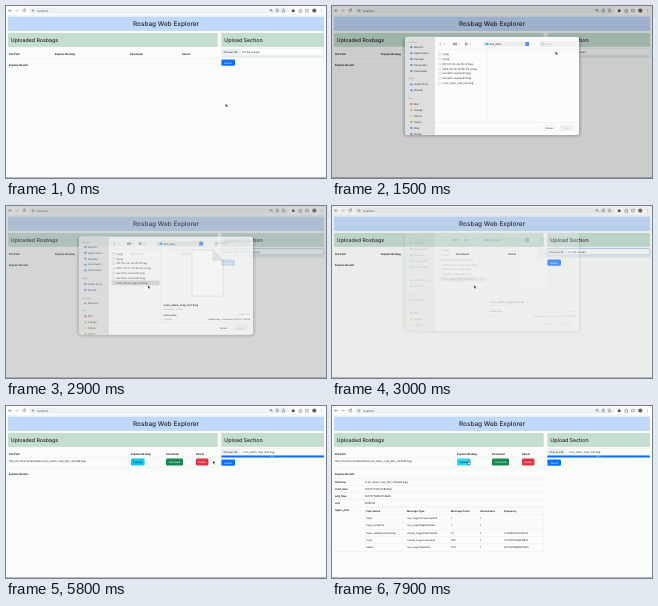
Animation, 320 px wide and 172 px high, one loop 8000 ms. Source, as an HTML page:

```html
<!DOCTYPE html>
<html lang="en">
<head>
<meta charset="utf-8">
<title>Rosbag Web Explorer</title>
<style>
html, body { margin: 0; height: 100%; overflow: hidden; background: #fafcfa; }
svg { display: block; width: 100vw; height: 100vh; font-family: Inter, "Open Sans", sans-serif; text-rendering: geometricPrecision; }
</style>
</head>
<body>
<svg id="stage" viewBox="0 0 320 172"></svg>
<script>
const INK = '#212529', LINE = '#dfe3e5', BLUE = '#0d6efd', BODY = 2.6;
const FILE = 'scan_odom_map_test.bag', STORED = 'scan_odom_map_test_cbufIuN.bag';

const rect = (x, y, w, h, fill, rx = 0, extra = '') =>
  `<rect x="${x}" y="${y}" width="${w}" height="${h}" fill="${fill}" rx="${rx}" ${extra}/>`;
// y is the middle of the line of text
const text = (x, y, s, size = BODY, fill = INK, weight = 400, anchor = 'start') =>
  `<text x="${x}" y="${y + size * .36}" font-size="${size}" fill="${fill}" font-weight="${weight}" text-anchor="${anchor}">${s}</text>`;
const bold = (x, y, s) => text(x, y, s, BODY, INK, 700);
const dot = (x, y, r, fill) => `<circle cx="${x}" cy="${y}" r="${r}" fill="${fill}"/>`;
const path = (d, color = '#5f6368', w = .5) =>
  `<path d="${d}" fill="none" stroke="${color}" stroke-width="${w}" stroke-linecap="round" stroke-linejoin="round"/>`;
const group = (id, body) => `<g id="${id}">${body}</g>`;
const rule = (y, x = 2, w = 210) => rect(x, y, w, .3, LINE);
const button = (id, x, y, w, h, fill, label) =>
  group(id, rect(x, y, w, h, fill, 1) + text(x + w / 2, y + h / 2, label, 2.4, fill === '#0dcaf0' ? '#111' : '#fff', 400, 'middle'));
const headings = xs => ['File Path', 'Explore Rosbag', 'Download', 'Delete'].map((s, i) => bold(xs[i], 47.7, s)).join('');

function browser() {
  return rect(0, 0, 320, 9.6, '#fdfdfd') + rect(0, 9.4, 320, .3, '#dcdfe1') +
    rect(22.5, 1.5, 260, 6.2, '#eff2f4', 3.1) +
    path('M5.6 4.6H2.8M4 3.4L2.8 4.6L4 5.8') +
    path('M9.4 4.6h2.8M11 3.4l1.2 1.2L11 5.8', '#b4b7ba') +
    path('M19.3 3.7A1.4 1.4 0 1 0 19.5 5M19.5 3v1h-1') +
    path('M26.2 4.6a.9 .9 0 1 0 1.8 0a.9 .9 0 1 0 -1.8 0') +
    text(31, 4.6, 'localhost', 2.7, '#3c4043') +
    path('M264 4.2a.9 .9 0 1 0 1.8 0a.9 .9 0 1 0 -1.8 0M265.6 4.9l.8 .8') +
    path('M270.2 4v1.9h2.2V4M271.3 4.9V2.9l-.7 .6m.7 -.6l.7 .6', '#5f6368', .4) +
    path('M277.5 3l.5 1.1 1.2 .1-.9 .8.3 1.2-1.1-.7-1.1.7.3-1.2-.9-.8 1.2-.1z', '#5f6368', .4) +
    rect(286, 3.4, 2.5, 2.5, '#3f4347', .5) +
    path('M293 5.9V4h.8a.6 .6 0 1 1 1 0h.9v1.9z') +
    path('M300 3.4h2.4v2.4H300z') +
    dot(308.3, 4.6, 2.1, '#7c5f50') +
    [3.3, 4.6, 5.9].map(y => dot(315.5, y, .33, '#5f6368')).join('');
}

function page() {
  const results = [['filename', STORED], ['start_time', '1677077740.0282202'],
    ['end_time', '1677077825.5114665'], ['size', '8113234'], ['topics_info', '']];
  const topics = [
    ['Topic Name', 'Message Type', 'Message Count', 'Connections', 'Frequency'],
    ['/map', 'nav_msgs/OccupancyGrid', '1', '1', ''],
    ['/map_metadata', 'nav_msgs/MapMetaData', '1', '1', ''],
    ['/laser_nodelet/cloud/map', 'sensor_msgs/PointCloud2', '21', '1', '0.2499975157162741'],
    ['/scan', 'sensor_msgs/LaserScan', '303', '1', '12.871927086541837'],
    ['/odom', 'nav_msgs/Odometry', '1714', '1', '20.050196899019415']];
  const cols = [34, 75, 119, 148, 172];
  const table = results.map(([k, v], i) => {
    const y = 75.6 + i * 7.2;
    return rule(y - 3.6) + bold(3, y, k) + text(33, y, v);
  }).join('') + topics.map((row, i) => {
    const y = 105 + i * 7.25;
    return rule(y - 3.6, 33, 179) + row.map((s, c) => i ? text(cols[c], y, s, 2.45) : text(cols[c], y, s, 2.45, INK, 700)).join('');
  }).join('') + rule(145) + rect(33, 101.4, .3, 43.6, LINE) + rect(211.7, 101.4, .3, 43.6, LINE);

  return rect(2, 10.6, 316, 14.4, '#c0d8fa') + text(160, 17.8, 'Rosbag Web Explorer', 6.45, INK, 500, 'middle') +
    rect(2, 27, 209.7, 13.8, '#c3ded0') + text(4.8, 34, 'Uploaded Rosbags', 5.25, INK, 500) +
    rect(215.3, 27, 102.7, 13.8, '#c3ded0') + text(218.3, 34, 'Upload Section', 5.25, INK, 500) +
    group('empty', headings([3, 49, 124, 176]) + rule(52.2) + bold(3, 59.2, 'Explore Results')) +
    group('filled', headings([3, 125, 160, 190]) + rule(51.2) +
      text(3, 54.8, 'http://localhost/media/files/' + STORED) +
      button('explore', 125, 52.6, 13.6, 6.8, '#0dcaf0', 'Explore') +
      button('download', 160, 52.6, 17, 6.8, '#198754', 'Download') +
      button('remove', 190, 52.6, 12.4, 6.8, '#dc3545', 'Delete') +
      rule(61.2) + bold(3, 68.4, 'Explore Results')) +
    group('results', table) +
    rect(215.4, 42.6, 102.4, 6.4, '#fdfefd', .9, 'id="field" stroke="#d3d8dc" stroke-width=".3"') +
    rect(215.6, 42.8, 18.8, 6, '#eceff1', .7, 'id="choose"') + text(217.4, 45.8, 'Choose File', 2.5) +
    group('noFile', text(236.6, 45.8, 'No file chosen', 2.5)) + group('named', text(236.6, 45.8, FILE, 2.6)) +
    rect(215.3, 49.6, 102.7, 2, '#e4e8ea', .5) + rect(215.3, 49.6, 0, 2, BLUE, .5, 'id="bar"') +
    group('percent', text(266.6, 50.6, '100%', 1.8, '#fff', 400, 'middle')) +
    button('submit', 215.4, 53.5, 13.6, 6.3, BLUE, 'Submit');
}

function dialog() {
  const W = '#fbfbfb', GREY = '#8b8b8b';
  const item = (y, s, color, tag) =>
    (tag ? dot(79.4, y, 1.1, color) : rect(78.3, y - .9, 2.2, 1.8, color, .5)) + text(82, y, s, 2.5, '#333');
  const head = (y, s) => text(76.2, y, s, 1.9, '#929292', 600);
  const tags = [['Red', '#f5483f'], ['Orange', '#f79a32'], ['Yellow', '#f4cb35'], ['Green', '#51c34f'], ['Blue', '#3088ec'], ['Purple', '#a95cc8']];
  const files = ['1.png', '2.png', '2011-01-24-06-18-27.bag', '2019-02-02-12-59-06_0.bag',
    'navsatfix-example1.bag', 'navsatfix-example2.bag', FILE];
  const fileY = i => 49.8 + i * 4.82;
  const sidebar = head(37.7, 'Favorites') +
    ['Recents', 'Applications', 'Desktop', 'Documents', 'Downloads'].map((s, i) => item(42.7 + i * 5.9, s, '#3f8fea')).join('') +
    head(74.3, 'Quorli') + item(79.8, 'Quorli Drive', '#3f8fea') + item(85.8, 'Shared', '#3f8fea') +
    group('places', head(93.8, 'Locations') + item(99.3, 'Network', '#858585')) +
    group('tags', head(106.6, 'Tags') + tags.map(([s, c], i) => item(112.3 + i * 6, s, c, true)).join(''));
  const preview = rect(105.5, fileY(6) - 2.3, 48, 4.6, '#d2d2d2', .8) +
    `<path d="M186 46h21l10 10v36h-31z" fill="#fff" stroke="#c9c9c9" stroke-width=".5"/>` +
    `<path d="M207 46v10h10z" fill="#e4e4e4" stroke="#c9c9c9" stroke-width=".4"/>` +
    text(157.5, 101.4, FILE, 2.7, '#222', 700) + text(157.5, 104.7, 'Document - 8.1 MB', 2.1, GREY) +
    text(157.5, 110.6, 'Information', 2.3, '#333', 700) + text(244, 110.6, 'Show Less', 2.1, GREY, 400, 'end') +
    text(157.5, 115.6, 'Created', 2.1, GREY) + text(244, 115.6, 'Wednesday, 22 February 2023 at 2:36 PM', 2.1, '#333', 400, 'end');
  return [3, 2, 1].map(i => rect(73 - i, 32.5 - i / 2, 174 + 2 * i, 98 + 1.5 * i, '#000', 3 + i, 'opacity=".06"')).join('') +
    rect(73, 32.3, 174, 98.2, W, 2.5) +
    `<clipPath id="side"><rect x="73" y="32.3" width="31" height="98.2" rx="2.5"/></clipPath>` +
    `<g clip-path="url(#side)">${rect(73, 32, 29.5, 99, '#dedede')}${sidebar}</g>` +
    rect(102.5, 32.3, .3, 98.2, '#cacaca') + rect(102.7, 45, 144.3, .3, '#dcdcdc') +
    rect(154.8, 45, .3, 73, '#d9d9d9') + rect(102.7, 118, 144.3, .3, '#dcdcdc') +
    path('M108.6 38.6l-.9 .9 .9 .9') + path('M112.2 38.6l.9 .9-.9 .9', '#b5b5b5') +
    [0, 1.2, 2.4].map(d => rect(121.4 + d, 38.3, .8, 2.5, '#666')).join('') + path('M126 39.1l.7 .7 .7-.7', '#777', .35) +
    [0, 1.4].map(d => rect(133 + d, 38.3, 1, 1, '#666') + rect(133 + d, 39.7, 1, 1, '#666')).join('') + path('M137.5 39.1l.7 .7 .7-.7', '#777', .35) +
    rect(150.5, 37, 47.4, 5, '#ededed', 1.2) + rect(153.5, 38.4, 3, 2.2, '#43aee8', .4) +
    text(157.8, 39.5, 'test_data', 2.6, '#333') + rect(193.3, 37.6, 3.7, 3.8, '#2f7fee', .9) +
    path('M194.4 39l.8-.7.8 .7M194.4 40l.8 .7.8-.7', '#fff', .35) +
    rect(208, 37, 35.5, 5, '#f1f1f1', 1.2, 'stroke="#d8d8d8" stroke-width=".25"') +
    path('M209.6 39.2a.8 .8 0 1 0 1.6 0a.8 .8 0 1 0 -1.6 0M211 39.8l.7 .7', GREY, .35) + text(213, 39.5, 'Search', 2.4, '#b0b0b0') +
    group('preview', preview) +
    files.map((s, i) => rect(106.7, fileY(i) - 1.2, 1.9, 2.4, '#fff', .2, 'stroke="#a6a6a6" stroke-width=".3"') +
      text(110.2, fileY(i), s, 2.55, '#333')).join('') +
    rect(210.5, 120.9, 13.6, 5.2, '#fff', 1.1, 'stroke="#d2d2d2" stroke-width=".3"') + text(217.3, 123.5, 'Cancel', 2.5, '#222', 400, 'middle') +
    rect(228, 120.9, 13.6, 5.2, '#f1f1f1', 1.1, 'stroke="#dedede" stroke-width=".3"') +
    text(234.8, 123.5, 'Open', 2.5, '#b5b5b5', 400, 'middle');
}

const stage = document.getElementById('stage');
stage.innerHTML = rect(0, 0, 320, 172, '#fafcfa') + browser() + page() +
  rect(0, 171, 320, 1, '#b9bcbb') +
  rect(0, 0, 320, 172, '#000', 0, 'id="dim"') + rect(0, 0, 320, 172, '#c5caca', 0, 'id="haze"') +
  group('dialog', dialog()) +
  group('cursor',
    '<path id="arrow" d="M0 0V3.2L.8 2.5L1.3 3.6L1.9 3.3L1.4 2.3H2.4Z" fill="#000" stroke="#fff" stroke-width=".3"/>' +
    '<path id="hand" d="M.1 .2Q.6-.3 .9.3V1.3L2.3 1.6Q2.6 1.7 2.5 2.3L2.1 3.5H.5L-.5 2.1Q-.3 1.6 .1 1.9Z" fill="#fff" stroke="#000" stroke-width=".35"/>');

const el = Object.fromEntries([...stage.querySelectorAll('[id]')].map(n => [n.id, n]));
const ramp = (t, a, b) => Math.min(1, Math.max(0, (t - a) / (b - a)));
const ease = k => k * k * (3 - 2 * k);
const show = (id, on) => { el[id].style.display = on ? '' : 'none'; };
const set = (id, name, v) => el[id].setAttribute(name, v);

// time, x, y of the pointer tip
const trail = [[0, 219.6, 97.8], [380, 219.6, 97.8], [1100, 223.6, 45.5], [1600, 223.6, 45.5], [2250, 142, 79.2],
  [3500, 142, 79.2], [3790, 223.2, 55.8], [5700, 223.2, 55.8], [5800, 207, 54.8], [6250, 135.8, 55.2], [8000, 135.8, 55.2]];

function pointer(t) {
  const i = trail.findIndex(p => p[0] > t), a = trail[i - 1], b = trail[i];
  const k = ease(ramp(t, a[0], b[0]));
  return [a[1] + (b[1] - a[1]) * k, a[2] + (b[2] - a[2]) * k];
}

function draw() {
  const t = performance.now() % 8000;
  const opened = ramp(t, 1250, 1480), closed = ramp(t, 2850, 3050), sheet = opened * (1 - closed);
  const settled = ramp(t, 1500, 1750);

  set('dim', 'opacity', .19 * sheet);
  set('haze', 'opacity', .3 * ramp(t, 1550, 2150) * (1 - closed));
  show('dialog', sheet > 0);
  set('dialog', 'opacity', sheet);
  set('dialog', 'transform', `translate(0 ${-6 * (1 - opened) - 1.5 * (1 - settled) - 7.3 * closed})`);
  show('places', t >= 1700);
  set('tags', 'transform', `translate(0 ${t < 1700 ? -12.8 : 0})`);
  show('preview', t >= 2650);

  const stored = t >= 4900;
  show('empty', !stored);
  show('filled', stored);
  show('results', t >= 7000);
  show('noFile', t < 3100);
  show('named', t >= 3100);
  const focus = t >= 2900 && t < 4350;
  set('field', 'stroke', focus ? '#8bb9fb' : '#d3d8dc');
  set('field', 'stroke-width', focus ? .7 : .3);
  const done = ramp(t, 4400, 4700);
  set('bar', 'width', 102.7 * done);
  show('percent', done === 1);

  const [x, y] = pointer(t);
  const over = (x0, x1) => x > x0 && x < x1 && y > 53 && y < 60;
  const onSubmit = over(215, 229), onExplore = stored && over(125, 139);
  const hand = onSubmit || onExplore;
  set('choose', 'fill', y < 49 && x > 215 && t < 1700 ? '#dde1e4' : '#eceff1');
  el.submit.firstChild.setAttribute('fill', onSubmit ? '#0b5ed7' : BLUE);
  el.explore.firstChild.setAttribute('fill', onExplore ? '#31d2f2' : '#0dcaf0');
  set('cursor', 'transform', `translate(${x} ${y})`);
  show('arrow', !hand);
  show('hand', hand);
  requestAnimationFrame(draw);
}
draw();
</script>
</body>
</html>
```
